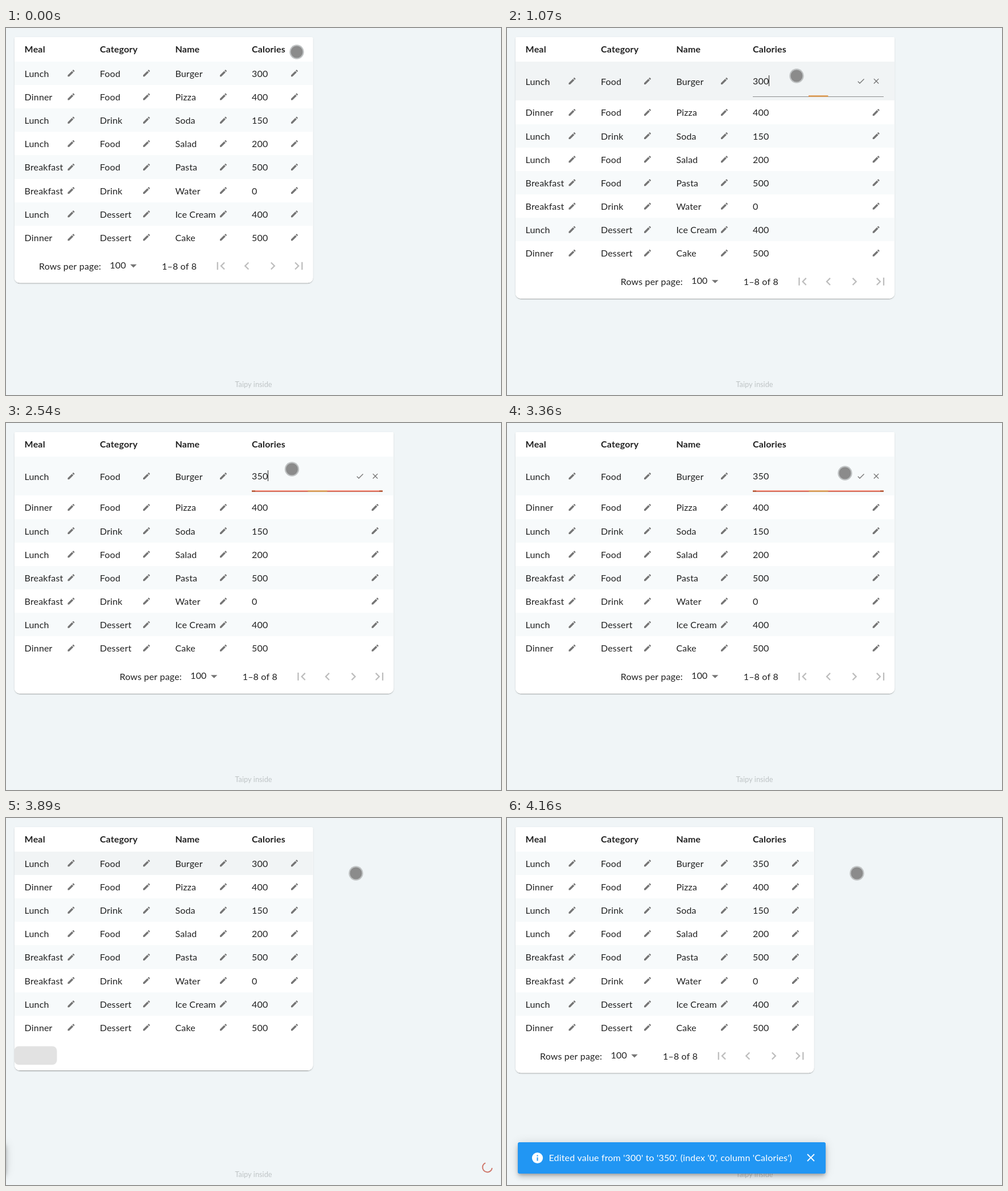
Recreate the animation shown at these times as an HTML page with a canvas. Size 870 px wide and 644 px high, loop 6.09 s.

```html
<!DOCTYPE html>
<html lang="en">
<head>
<meta charset="utf-8">
<title>Editable table</title>
<style>
  html, body { margin: 0; width: 100%; height: 100%; overflow: hidden; background: #f0f5f7; }
  canvas { display: block; }
</style>
</head>
<body>
<canvas id="stage" width="870" height="644"></canvas>
<script>
const c = document.getElementById('stage').getContext('2d');
const LOOP = 6090, STEP = 68;
const ZOOM = 8 / 7, ROW = 36 * ZOOM, TOP = 58.8;
const INK = 'rgba(0,0,0,.87)', ICON = '#757575', FAINT = '#bdbdbd';
const COLS = [32.6, 165, 297.4, 432];
const PENCILS = [114.5, 247, 382, 507];
const HEAD = ['Meal', 'Category', 'Name', 'Calories'];
const ROWS = [
  ['Lunch', 'Food', 'Burger', '300'],
  ['Dinner', 'Food', 'Pizza', '400'],
  ['Lunch', 'Drink', 'Soda', '150'],
  ['Lunch', 'Food', 'Salad', '200'],
  ['Breakfast', 'Food', 'Pasta', '500'],
  ['Breakfast', 'Drink', 'Water', '0'],
  ['Lunch', 'Dessert', 'Ice Cream', '400'],
  ['Dinner', 'Dessert', 'Cake', '500']
];

// Icons on a 24-unit grid
const pencil = new Path2D('M3 17.25V21h3.75L17.81 9.94l-3.75-3.75L3 17.25zM20.71 7.04c.39-.39.39-1.02 0-1.41l-2.34-2.34c-.39-.39-1.02-.39-1.41 0l-1.83 1.83 3.75 3.75 1.83-1.83z');
const check = new Path2D('M9 16.17 4.83 12l-1.42 1.41L9 19 21 7l-1.41-1.41z');
const cross = new Path2D('M19 6.41 17.59 5 12 10.59 6.41 5 5 6.41 10.59 12 5 17.59 6.41 19 12 13.41 17.59 19 19 17.59 13.41 12z');
const down = new Path2D('M7 10l5 5 5-5z');
const pagers = [
  'M18.41 16.59 13.82 12l4.59-4.59L17 6l-6 6 6 6zM6 6h2v12H6z',
  'M15.41 16.59 10.83 12l4.58-4.59L14 6l-6 6 6 6z',
  'M8.59 16.59 13.17 12 8.59 7.41 10 6l6 6-6 6z',
  'M5.59 7.41 10.18 12l-4.59 4.59L7 18l6-6-6-6zM16 6h2v12h-2z'
].map(d => new Path2D(d));

function rect(x, y, w, h, color) {
  c.fillStyle = color;
  c.fillRect(x, y, w, h);
}

// Baselines sit on whole pixels
function text(s, x, y, color = INK, font = '16px') {
  c.font = font + ' Lato, sans-serif';
  c.fillStyle = color;
  c.fillText(s, x, Math.round(y));
}

function icon(path, x, y, size = 14, color = ICON) {
  const k = size * ZOOM / 24;
  c.save();
  c.translate(x - 12 * k, y - 12 * k);
  c.scale(k, k);
  c.fillStyle = color;
  c.fill(path);
  c.restore();
}

function disc(x, y, r, color) {
  c.fillStyle = color;
  c.beginPath();
  c.arc(x, y, r, 0, 7);
  c.fill();
}

// Rounded box; each shadow is [offset y, blur, spread, alpha]
function box(x, y, w, h, radii, color, shadows = []) {
  const shape = s => {
    c.beginPath();
    c.roundRect(x - s, y - s, w + 2 * s, h + 2 * s, radii);
    c.fill();
  };
  c.fillStyle = color;
  for (const [dy, blur, spread, alpha] of shadows) {
    c.save();
    c.shadowColor = `rgba(0,0,0,${alpha})`;
    c.shadowOffsetY = dy;
    c.shadowBlur = blur;
    shape(spread);
    c.restore();
  }
  shape(0);
}

function editor(t) {
  const value = t < 1940 ? '300' : t < 2140 ? '30' : t < 2340 ? '3' : t < 2540 ? '35' : '350';
  text(value, 432, 99);
  if (t < 1610 || (t >= 2140 && t < 3080)) {
    rect(Math.floor(432 + c.measureText(value).width), 83, 1, 19, '#222');
  }
  icon(check, 622, 93.3);
  icon(cross, 649, 93.3);

  // The focus line grows from the middle
  rect(432, 120, 230, 1, '#8b8d8e');
  const half = t < 1140 ? 17 : t < 1210 ? 98 : 115;
  const line = (x, w, color) => rect(x, 118.5, w, 2, color);
  line(547 - half, half * 2, '#f4644a');
  if (half === 115) {
    line(432, 6, '#b0552f');
    line(656, 6, '#b0552f');
  }
  line(530.5, 34, '#dca750');
}

function table(t) {
  const edit = t >= 1070 && t < 3830;
  const loading = t >= 3830 && t < 3960;
  const hover = (t >= 940 && t < 1280) || (t >= 3700 && t < 3960);
  const dx = edit ? 124 * ZOOM : 0, dy = edit ? 24 * ZOOM : 0;
  const width = 524.5 + dx;

  box(15, 16, width, (loading ? 427 : 431.3) + dy, [3, 3, 9, 9], '#fff',
    [[2, 1, -1, .2], [1, 1, 0, .14], [1, 3, 0, .12]]);
  HEAD.forEach((s, i) => text(s, COLS[i], 43, INK, 'bold 16px'));

  ROWS.forEach((row, r) => {
    const top = TOP + r * ROW + (r ? dy : 0);
    const bottom = TOP + (r + 1) * ROW + dy;
    const mid = r ? 0 : dy / 2;
    if (r % 2 === 0) {
      const y = Math.round(top);
      rect(15, y, width, Math.round(bottom) - y, !r && hover ? '#f1f4f5' : '#f7fafb');
    }
    row.forEach((s, i) => {
      if (i === 3 && !r && edit) return editor(t);
      text(i === 3 && !r && t >= 3960 ? '350' : s, COLS[i], top + 27 + mid);
      icon(pencil, PENCILS[i] + (i === 3 ? dx : 0), top + ROW / 2 + mid);
    });
  });

  if (loading) {
    box(14.5, 400.5, 75, 32.5, 8, '#e2e2e2');
    return;
  }
  text('Rows per page:', 58 + dx, 424 + dy);
  text('100', 182.5 + dx, 422 + dy);
  icon(down, 224 + dx, 417 + dy, 24);
  text('1–8 of 8', 274 + dx, 424 + dy);
  pagers.forEach((p, i) => icon(p, 377.5 + i * 40 * ZOOM + dx, 417.5 + dy, 24, FAINT));
}

function spinner(t) {
  const turn = Math.floor((t - 3890) / 67) * .3;
  c.strokeStyle = '#cf786c';
  c.lineWidth = 2;
  c.beginPath();
  c.arc(846, 613, 8.4, .12 + turn, 4.3 + turn);
  c.stroke();
}

function toast(t) {
  const u = Math.min(1, Math.floor((t - 3890) / 67) * 67 / 225);
  c.save();
  c.translate(-560 * (1 - u) ** 3, 0);
  box(19, 569, 541, 55, 4, '#2196f3', [[3, 5, -1, .2], [6, 10, 0, .14], [1, 18, 0, .12]]);
  disc(53.5, 596.5, 9.6, '#fff');
  rect(52.5, 595.5, 2, 6, '#2196f3');
  rect(52.5, 591.5, 2, 2, '#2196f3');
  text("Edited value from '300' to '350'. (index '0', column 'Calories')", 73.5, 602, '#fff');
  icon(cross, 534, 596, 20, '#fff');
  c.restore();
}

function pointer(t) {
  let x, y;
  if (t < 1280) {
    const u = t < 330 ? 0 : Math.min(1, (Math.floor((t - 330) / STEP) + 1) / 9);
    x = 511 - 40.7 * u + 38.7 * u * u;
    y = 42 + 29.9 * u + 12.1 * u * u;
  } else if (t < 1350) {
    x = 506;
    y = 82.5;
  } else {
    const u = t < 3080 ? 0 : Math.min(1, Math.floor((t - 3080) / STEP) / 8);
    x = Math.min(615, 502.5 + 253.5 * u - 141 * u * u);
    y = 81 + 12 * u + 4 * u * u;
  }
  disc(x, y, 12.7, '#bfc2c3');
  disc(x, y, 10.5, '#8b8b8b');
}

function draw(t) {
  rect(0, 0, 870, 644, '#f0f5f7');
  c.letterSpacing = '0px';
  c.textAlign = 'center';
  text('Taipy inside', 435, 630, '#bfc4c6', '12.8px');
  c.letterSpacing = '.17px';
  c.textAlign = 'left';
  table(t);
  if (t >= 3830 && t < 4090) spinner(t);
  if (t >= 3890) toast(t);
  pointer(t);
}

let start;
function frame(now) {
  start ??= now;
  draw((now - start) % LOOP);
  requestAnimationFrame(frame);
}
requestAnimationFrame(frame);
</script>
</body>
</html>
```
